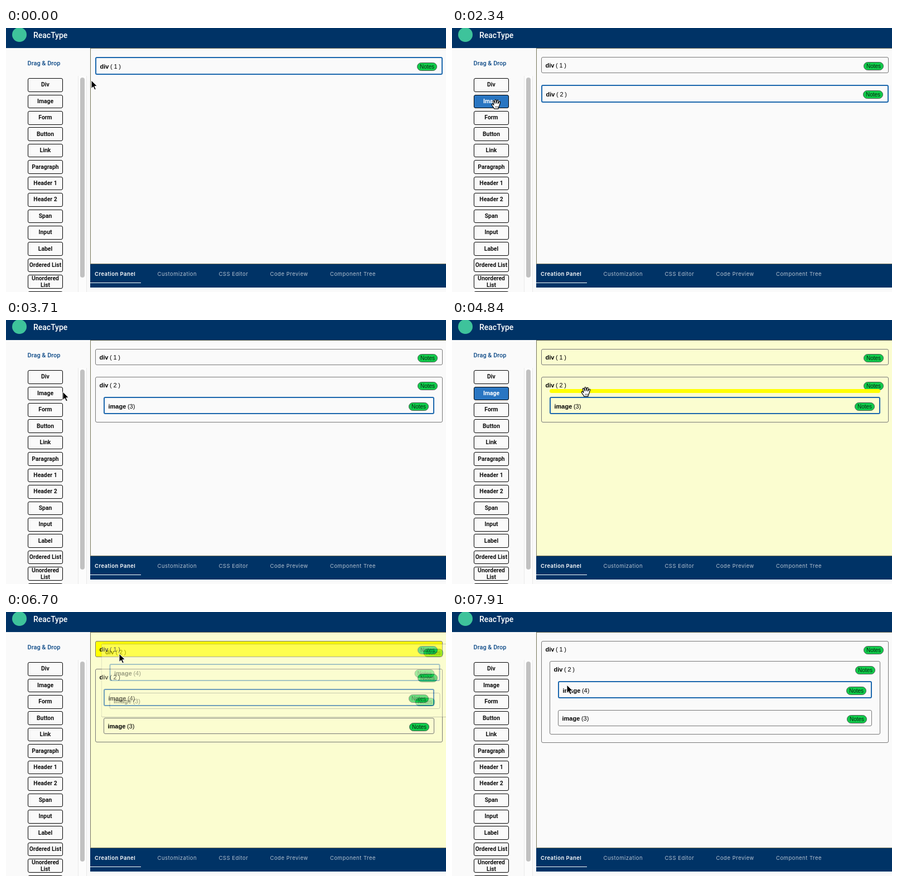
Animation, 789 px wide and 474 px high, one loop 8000 ms. Source, as an HTML page:

```html
<!DOCTYPE html>
<html lang="en">
<head>
<meta charset="utf-8">
<title>Drag and drop builder</title>
<style>
  * { box-sizing: border-box; }
  html, body { margin: 0; width: 100%; height: 100%; overflow: hidden; }
  #stage { position: relative; width: 789px; height: 474px; overflow: hidden; background: #fafafa; }
  #stage div, #stage svg, .note { position: absolute; }

  .head { left: 0; top: 0; width: 789px; height: 36px; background: #036; }
  .logo { left: 11px; top: -1px; width: 26px; height: 26px; border-radius: 50%; background: #3ec39b; }
  .name { left: 49px; top: 3px; font: 500 14px/20px Roboto, sans-serif; color: #fff; }

  .side { left: 0; top: 36px; width: 151px; height: 438px; overflow: hidden; }
  .caption { left: 0; top: 20px; width: 136px; text-align: center; color: #0d4a87;
    font: 500 11px/16px Roboto, sans-serif; }
  .track { left: 129px; top: 50px; width: 16px; height: 400px; background: #fcfcfc;
    border: solid #e9e9e9; border-width: 0 1px; }
  .thumb { left: 133px; top: 53px; width: 8px; height: 359px; border-radius: 4px; background: #c1c1c1; }
  .item { left: 39px; width: 63px; height: 24.6px; border: 1px solid #000; border-radius: 3px;
    display: flex; align-items: center; justify-content: center; text-align: center;
    background: #fafafa; color: #111; font: 700 10.4px/12px Roboto, sans-serif; }

  .canvas { left: 151px; top: 36px; width: 638px; height: 388px; background: #fafafa;
    border: 1px solid #75755a; border-right: 0; }
  .board { left: 160px; top: 0; width: 623px; height: 474px; }
  .node { left: 0; right: 0; border: 1px solid #777; border-radius: 3px; color: #000; white-space: pre;
    font: 11px/29px "Liberation Sans", Arial, sans-serif; word-spacing: -.4px; }
  .node .node { left: 14px; right: 14px; }
  .node.on { border: 2px solid #1b67ad; }
  .label { left: 6.5px; top: 0; }
  .on > .label { top: .5px; }
  .note { right: 8px; top: 7.5px; width: 36px; height: 15px; border: 1px solid #4b5a4f; border-radius: 8px;
    background: #10cc4b; color: #06280f; text-align: center;
    font: 10px/13.5px "Liberation Sans", Arial, sans-serif; }
  .slot { left: 14px; right: 14px; top: 21px; height: 7px; border-radius: 4px; background: #ff0; }
  .ghost { left: 160px; top: 102px; width: 623px; height: 132px; opacity: .38; background: #fbfcd0; }

  .tabs { left: 151px; top: 423px; width: 638px; height: 43px; padding: 10px 8px; background: #036;
    border-top: 1px solid #75755a; display: flex; gap: 39.2px; white-space: nowrap;
    color: #b3c1d0; letter-spacing: .5px; font: 400 9.5px/16px Inter, sans-serif; }
  .tabs b { color: #fff; font-weight: 600; letter-spacing: .45px; }
  .line { left: 0; top: 33px; width: 91px; height: 1px; background: #fff; }

  #cursor { left: 0; top: 0; width: 0; height: 0; }
  #cursor svg { overflow: visible; width: 1px; height: 1px; left: 0; top: 0; }
</style>
</head>
<body>
<div id="stage">
  <div class="canvas" id="canvas"></div>
  <div id="boards"></div>
  <div class="head"><div class="logo"></div><div class="name">ReacType</div></div>
  <div class="side" id="side">
    <div class="caption">Drag &amp; Drop</div>
    <div class="track"></div><div class="thumb"></div>
  </div>
  <div class="tabs">
    <b>Creation Panel</b><span>Customization</span><span>CSS Editor</span><span>Code Preview</span>
    <span>Component Tree</span><div class="line"></div>
  </div>
  <div id="cursor">
    <svg id="arrow"><path d="M0 0V14.6L3.4 11.5L5.9 17L8.3 16L5.9 10.6H10.6Z"
      fill="#000" stroke="#fff" stroke-width="1" stroke-linejoin="round"/></svg>
    <svg id="hand"><path d="M-3.4 8.2C-4 5.6 -6.6 3.6 -7.6 1.2C-8.2 -.6 -6.4 -1.4 -5.2 0L-4 1.4
      L-5.6 -4.6C-6 -6.6 -3.8 -7 -3.2 -5.2L-2 -1.6L-2.2 -7C-2.2 -9 .2 -9 .4 -7L.7 -1.8
      L1.8 -6.6C2.3 -8.4 4.5 -7.8 4.2 -6L3.5 -1.2L5.4 -4.2C6.4 -5.8 8.2 -4.6 7.5 -3
      C6.4 -.4 6.5 3 4.4 5.6L4 8.2Z" fill="#fff" stroke="#000" stroke-width="1.2" stroke-linejoin="round"/>
      <path d="M-1 3.4V6M1 3.4V6M3 3.4V6" stroke="#000" stroke-width=".7"/></svg>
  </div>
</div>
<script>
  const LOOP = 8000;
  const GLIDE = 'cubic-bezier(.215, .61, .355, 1)';
  const $ = id => document.getElementById(id);

  function add(parent, cls, html = '', style = {}) {
    const el = document.createElement('div');
    el.className = cls;
    el.innerHTML = html;
    Object.assign(el.style, style);
    parent.append(el);
    return el;
  }

  // keys: [ms, value], the last value holds until the loop ends
  function play(el, prop, keys, easing = 'linear') {
    const frames = [...keys, [LOOP, keys[keys.length - 1][1]]]
      .map(([ms, value]) => ({ offset: ms / LOOP, [prop]: value, easing }));
    el.animate(frames, { duration: LOOP, iterations: Infinity });
  }

  // Hard switch to a value during each [from, to] span
  function during(el, prop, on, off, spans) {
    const keys = spans.flatMap(([a, b]) => [[a, on], [b, off]]);
    if (spans[0][0] > 0) keys.unshift([0, off]);
    play(el, prop, keys.filter(k => k[0] < LOOP), 'step-end');
  }
  const show = (el, ...spans) => during(el, 'visibility', 'visible', 'hidden', spans);

  // Each drag ends in a drop, which brings the next board
  const drags = [{ from: 1290, drop: 1750 }, { from: 2580, drop: 3490 },
    { from: 4340, drop: 5060 }, { from: 6590, drop: 7500 }];
  const [first, second, third, last] = drags;

  // Sidebar
  const items = ['Div', 'Image', 'Form', 'Button', 'Link', 'Paragraph', 'Header 1', 'Header 2', 'Span',
    'Input', 'Label', 'Ordered List', 'Unordered List', 'Menu'].map((text, i) =>
    add($('side'), 'item', text, { top: 54.2 + i * 29.42 + 'px' }));

  function hover(el, spans) {
    for (const [prop, off, on] of [['backgroundColor', '#fafafa', '#2a76c2'], ['color', '#111', '#fff']]) {
      const keys = spans.flatMap(([a, b]) => [[a, off], [a + 180, on], [b, on], [b + 1, off]]);
      play(el, prop, [[0, off], ...keys]);
    }
  }
  const onDiv = [[180, first.drop], [5760, 6100]];
  const onImage = [[1880, second.drop], [3750, third.drop]];
  hover(items[0], onDiv);
  hover(items[1], onImage);

  // Boards
  function node(parent, type, id, y, h, on) {
    const el = add(parent, on ? 'node on' : 'node', '', { top: y + 'px', height: h + 'px' });
    add(el, 'label', `<b>${type}</b> ${type === 'div' ? `( ${id} )` : `(${id})`}`);
    el.insertAdjacentHTML('beforeend', '<span class="note">Notes</span>');
    return el;
  }
  function images(parent) {
    node(parent, 'image', 4, 35, 31, true);
    node(parent, 'image', 3, 87, 29);
  }
  const lit = (el, from, to) => during(el, 'backgroundColor', '#ff0', 'transparent', [[from, to]]);

  const edges = [0, ...drags.map(d => d.drop), LOOP];
  const boards = drags.concat(null).map((_, i) => {
    const el = add($('boards'), 'board');
    show(el, [edges[i], edges[i + 1]]);
    return el;
  });

  node(boards[0], 'div', 1, 52, 32, true);

  node(boards[1], 'div', 1, 52, 29);
  lit(node(boards[1], 'div', 2, 102, 32, true), 2900, second.drop);

  node(boards[2], 'div', 1, 52, 29);
  const outer = node(boards[2], 'div', 2, 102, 82);
  show(add(outer, 'slot'), [4600, third.drop]);
  node(outer, 'image', 3, 35, 31, true);

  lit(node(boards[3], 'div', 1, 52, 29), 6650, last.drop);
  images(node(boards[3], 'div', 2, 102, 132));

  images(node(node(boards[4], 'div', 1, 52, 183), 'div', 2, 35, 132));

  const ghost = add($('boards'), 'ghost');
  images(node(ghost, 'div', 2, 0, 132));
  show(ghost, [last.from, last.drop]);

  during($('canvas'), 'backgroundColor', '#fbfdd0', '#fafafa', drags.map(d => [d.from + 100, d.drop]));

  // Pointer: rest point, then glides as { at, ms, to }
  const rest = [153, 94];
  const glides = [
    { at: 80, ms: 280, to: [78, 113] },
    { at: first.from, ms: 310, to: [229, 115] },
    { at: first.drop, ms: 310, to: [79, 137] },
    { at: second.from, ms: 670, to: [215, 110] },
    { at: second.drop, ms: 510, to: [78, 133] },
    { at: third.from, ms: 500, to: [240, 129] },
    { at: 5230, ms: 290, to: [205, 167] },
    { at: 5520, ms: 500, to: [82, 106] },
    { at: 6070, ms: 280, to: [182, 118] },
    { at: last.from, ms: 110, to: [203, 75] },
    { at: 7030, ms: 240, to: [206, 68] },
    { at: 7740, ms: 170, to: [206, 131] }
  ];

  function follow(el, dx, dy) {
    const place = ([x, y]) => `translate(${x + dx}px, ${y + dy}px)`;
    let here = rest;
    const keys = [[0, place(here)]];
    for (const { at, ms, to } of glides) {
      keys.push([at, place(here)], [at + ms, place(to)]);
      here = to;
    }
    play(el, 'transform', keys, GLIDE);
  }
  follow($('cursor'), 0, 0);
  follow(ghost, -192.5, -120);

  const held = [...onDiv, ...onImage].sort((a, b) => a[0] - b[0]);
  show($('hand'), ...held);
  during($('arrow'), 'visibility', 'hidden', 'visible', held);
</script>
</body>
</html>
```
